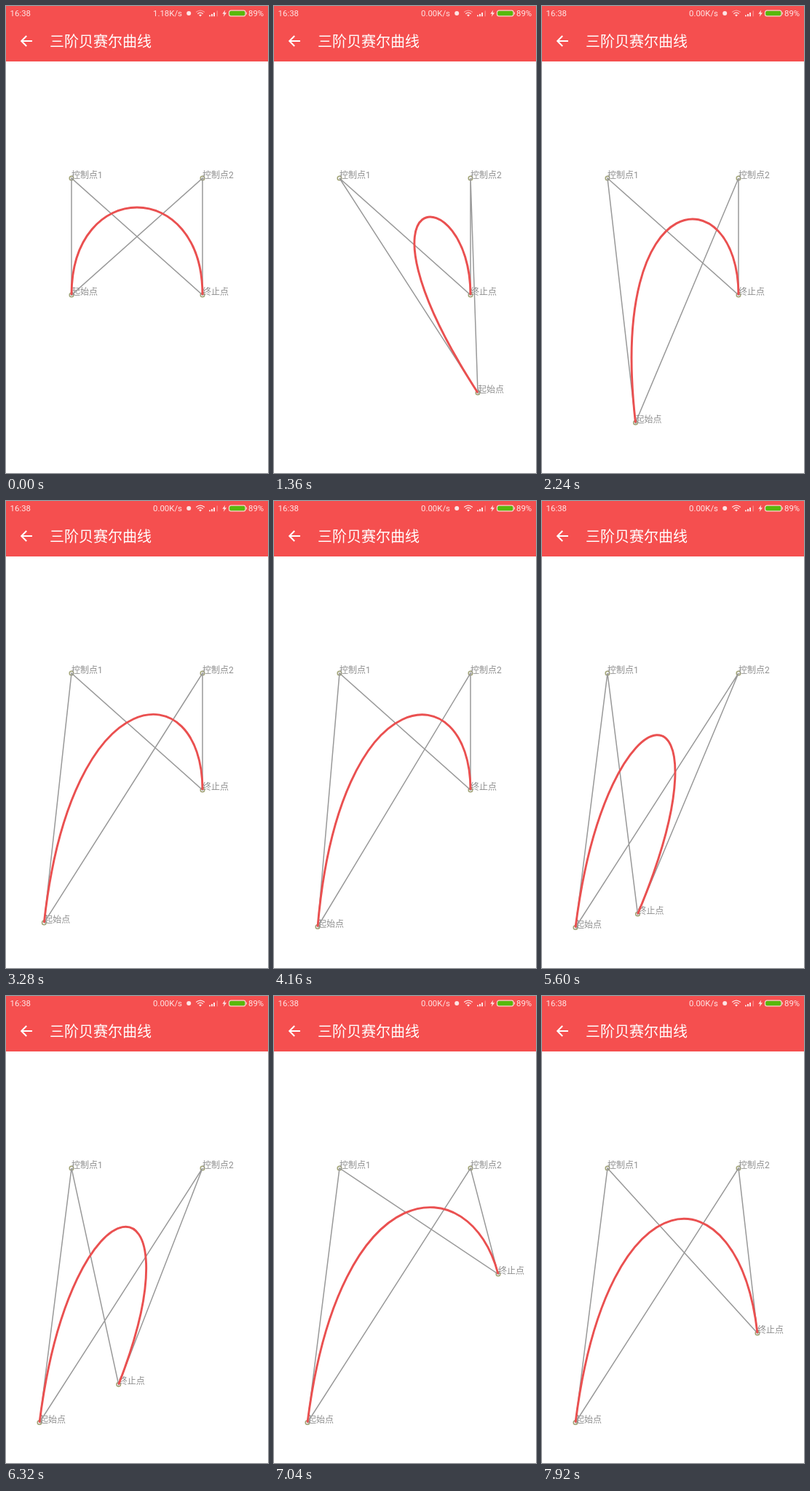
An HTML page that plays this animation: 360 by 640 pixels, repeating every 8 s.

```html
<!DOCTYPE html>
<html lang="zh-CN">
<head>
<meta charset="utf-8">
<title>三阶贝赛尔曲线</title>
<style>
  html, body { margin: 0; width: 100%; height: 100%; overflow: hidden; background: #fff; }
  svg { display: block; width: 100%; height: 100%; font-family: Roboto, "Noto Sans CJK SC", sans-serif; }
  .status { font-size: 11.4px; fill: #fff; opacity: .85; }
  .title { font-size: 20px; fill: #fff; }
  .label { font-size: 12px; fill: #8f8f8f; }
  .dot { fill: none; stroke: #a0a276; stroke-width: 1.5; }
  .guides { fill: none; stroke: #999; stroke-width: 1.5; }
  .curve { fill: none; stroke: #ea5050; stroke-width: 2.9; }
</style>
</head>
<body>
<svg viewBox="0 0 360 640">
  <rect width="360" height="640" fill="#fff"/>
  <rect width="360" height="76" fill="#f54f4f"/>
  <g class="status">
    <text x="5.6" y="14.4">16:38</text>
    <text id="speed" x="242" y="14.4" text-anchor="end"></text>
    <text x="333" y="14.4">89%</text>
    <circle cx="251.2" cy="10" r="3"/>
    <g fill="none" stroke="#fff" stroke-width="1.3">
      <path id="outerWave" d="M261.2 8.6Q267 3.6 272.8 8.6"/>
      <path d="M263.3 10.8Q267 7.5 270.7 10.8"/>
    </g>
    <path d="M265 12.3Q267 10.8 269 12.3L267 14.4Z"/>
    <path d="M279 14.2V12.6H281V14.2ZM282 14.2V11H284V14.2ZM285 14.2V9H287V14.2Z"/>
    <path d="M289.5 14.2V6.5H291V14.2Z" opacity=".35"/>
    <path d="M301.2 5.5L297.3 10.8H299.8L298.8 14.8L303 9.2H300.4Z"/>
  </g>
  <rect x="306.5" y="6.2" width="22.5" height="7.6" rx="2.6" fill="#58b80c" stroke="#f8d5cc" stroke-width="1.2"/>
  <path d="M330.3 8.6V11.6" stroke="#f8d5cc" stroke-width="1.2"/>
  <path d="M36 48H21.6M28.2 41L21.2 48L28.2 55" fill="none" stroke="#fff" stroke-width="2"/>
  <text class="title" x="60" y="56">三阶贝赛尔曲线</text>
  <g id="points"></g>
  <path id="guides" class="guides"/>
  <path id="curve" class="curve"/>
</svg>
<script>
const LOOP = 8000, STEP = 80;
const $ = id => document.getElementById(id);
const c1 = [90, 236], c2 = [270, 236];

// Turning points of the two drags: time, x, y
const startDrag = [
  [240, 90, 396], [1360, 280, 530], [2000, 240, 561],
  [2240, 128.5, 571], [2880, 50, 575], [4160, 60, 583.5], [4560, 46, 584.5]
];
const endDrag = [
  [4800, 270, 396], [5600, 131.5, 566], [5920, 110, 576.5],
  [6000, 110, 576.5], [7040, 308, 381], [7920, 296, 462]
];

function slope(keys, i, k) {
  const a = keys[i - 1], b = keys[i], c = keys[i + 1];
  if (!a || !c) return 0;
  const before = (b[k] - a[k]) / (b[0] - a[0]);
  const after = (c[k] - b[k]) / (c[0] - b[0]);
  // Harmonic mean keeps the path from overshooting its keys
  return before * after > 0 ? 2 * before * after / (before + after) : 0;
}

function along(keys, time) {
  const last = keys.length - 1;
  const t = Math.min(Math.max(time, keys[0][0]), keys[last][0]);
  const j = Math.max(1, keys.findIndex(key => key[0] >= t)), i = j - 1;
  const a = keys[i], b = keys[j], d = b[0] - a[0], u = (t - a[0]) / d;
  return [1, 2].map(k =>
    a[k] + (b[k] - a[k]) * u * u * (3 - 2 * u) +
    d * u * (1 - u) * (slope(keys, i, k) * (1 - u) - slope(keys, j, k) * u));
}

function makePoint(name) {
  const add = (tag, cls) => {
    const el = document.createElementNS("http://www.w3.org/2000/svg", tag);
    el.setAttribute("class", cls);
    return $("points").appendChild(el);
  };
  const dot = add("circle", "dot"), label = add("text", "label");
  dot.setAttribute("r", 2.8);
  label.textContent = name;
  return ([x, y]) => {
    dot.setAttribute("cx", x);
    dot.setAttribute("cy", y);
    label.setAttribute("x", x);
    label.setAttribute("y", y);
  };
}

const [placeStart, placeEnd, placeC1, placeC2] =
  ["起始点", "终止点", "控制点1", "控制点2"].map(makePoint);
placeC1(c1);
placeC2(c2);

function draw(time) {
  const t = Math.floor(time % LOOP / STEP) * STEP;
  const start = along(startDrag, t), end = along(endDrag, t);
  placeStart(start);
  placeEnd(end);
  $("guides").setAttribute("d", `M${start}L${c1}L${end}L${c2}Z`);
  $("curve").setAttribute("d", `M${start}C${c1} ${c2} ${end}`);
  $("speed").textContent = t < 800 ? "1.18K/s" : "0.00K/s";
  $("outerWave").setAttribute("opacity", t < 2560 ? .5 : 1);
}

let origin;
function tick(now) {
  origin ??= now;
  draw(now - origin);
  requestAnimationFrame(tick);
}
draw(0);
requestAnimationFrame(tick);
</script>
</body>
</html>
```
